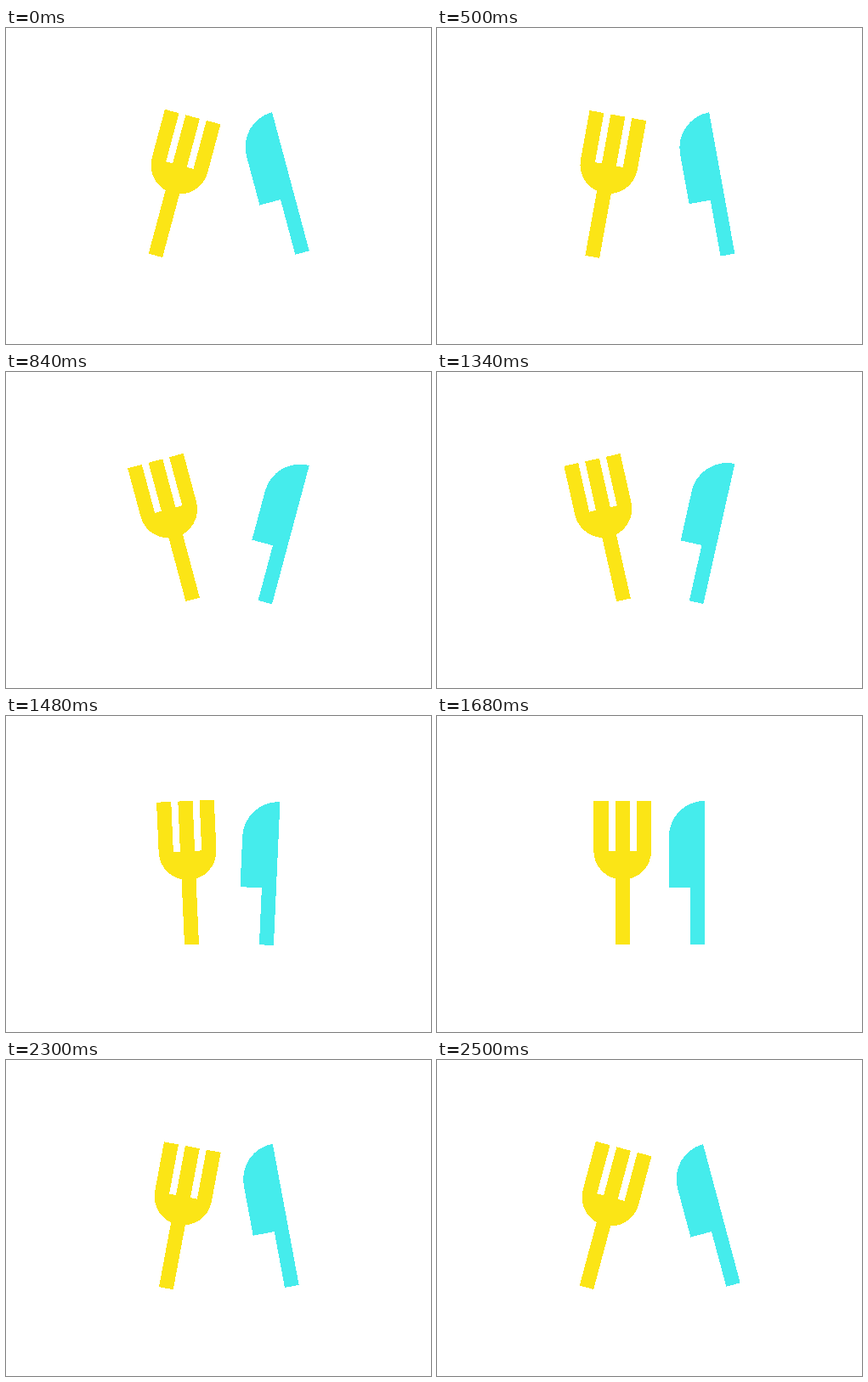
These frames come from a looping animation (500 by 372 pixels, 2520 ms). An HTML page without scripts:

```html
<!DOCTYPE html>
<html lang="en">
<head>
<meta charset="utf-8">
<title>Fork and knife</title>
<style>
  /* Remaining distance of each of the three moves: 1 = not begun, 0 = done */
  @property --sway { syntax: "<number>"; inherits: true; initial-value: 1; }
  @property --join { syntax: "<number>"; inherits: true; initial-value: 1; }
  @property --part { syntax: "<number>"; inherits: true; initial-value: 1; }

  html, body {
    margin: 0;
    width: 100%;
    height: 100%;
    overflow: hidden;
    background: #fff;
  }

  svg {
    display: block;
    width: 100%;
    height: 100%;
    shape-rendering: crispEdges;
    animation: moves 2520ms steps(18, start) infinite;

    /* Cubing the remainder gives a cubic ease-out */
    --s: calc(var(--sway) * var(--sway) * var(--sway));
    --j: calc(var(--join) * var(--join) * var(--join));
    --p: calc(var(--part) * var(--part) * var(--part));
    --tilt: calc(1 + 2 * var(--s) - var(--j) - var(--p));
    --near: calc(var(--p) - var(--j));
  }

  path {
    transform:
      translate(
        calc(256.1px + var(--side) * (58.3px - 20.4px * var(--near))),
        calc(186.2px - 1.9px * var(--near)))
      rotate(calc(var(--side) * var(--tilt) * -15deg));
  }

  .fork { --side: -1; fill: #fbe516; }
  .knife { --side: 1; fill: #45ecec; }

  @keyframes moves {
    0%, 19.84% { --sway: 1; --join: 1; --part: 1; }
    34.12%, 53.17% { --sway: 0; --join: 1; --part: 1; }
    67.45% { --sway: 0; --join: 0; --part: 1; }
    87.29% {
      --sway: 0; --join: 0; --part: 1;
      animation-timing-function: steps(16, start);
    }
    100% { --sway: 0; --join: 0; --part: .1111; }
  }
</style>
</head>
<body>
<svg viewBox="0 0 500 372">
  <path class="fork" d="M-33.9-84.5h17.2v59h8.1v-59h17.2v59h8.1v-59h17.2v59a33.9 33.9 0 0 1-67.8 0zM-8.5 0h17v84.5h-17z"/>
  <path class="knife" d="M21.2-84.5V84.5H4.2V17.5H-21.2V-42.1A42.4 42.4 0 0 1 21.2-84.5z"/>
</svg>
</body>
</html>
```
